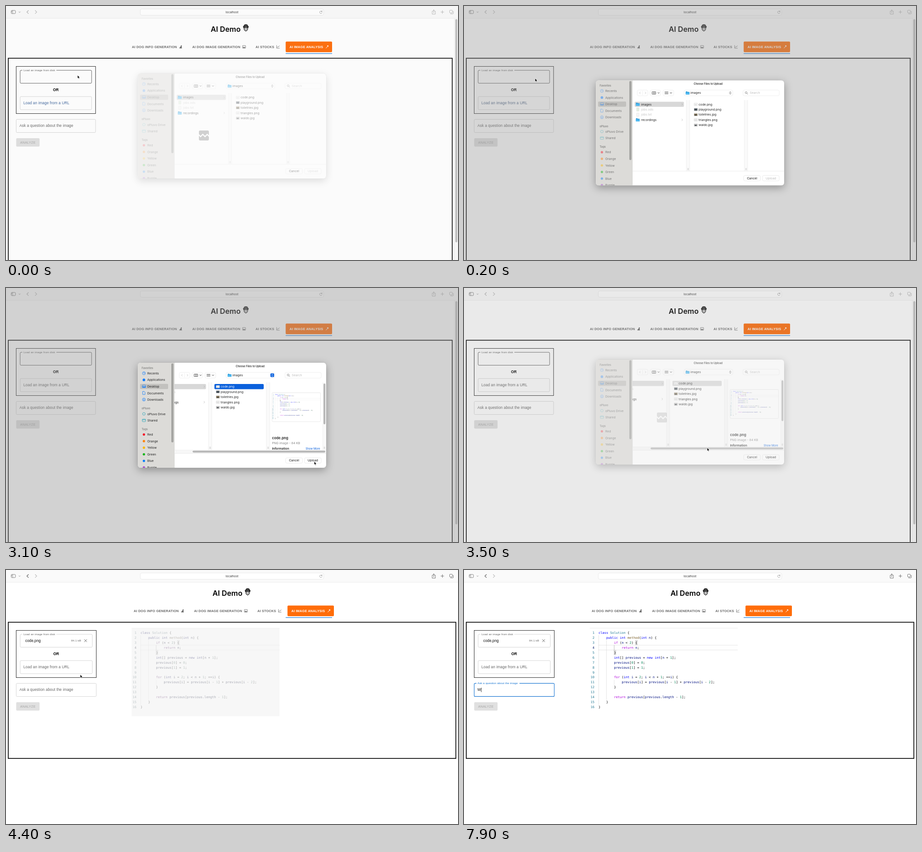
An HTML page that plays this animation: 998 px wide and 561 px high, repeating every 8000 ms.

```html
<!DOCTYPE html>
<html lang="en">
<head>
<meta charset="utf-8">
<title>AI Demo</title>
<style>
html, body { margin: 0; width: 100%; height: 100%; overflow: hidden; background: #fff; }
svg { display: block; width: 100vw; height: 100vh; font-family: "Liberation Sans", Arial, sans-serif; }
text { white-space: pre; }
.ui { font-family: Inter, "Open Sans", sans-serif; }
.mono { font-family: "DejaVu Sans Mono", "Liberation Mono", monospace; }
.b { font-weight: 700; }
.s { font-weight: 600; }
.mid { text-anchor: middle; }
.end { text-anchor: end; }
.caps { letter-spacing: .2px; }
.body { letter-spacing: .078px; }
</style>
</head>
<body>
<svg id="stage" viewBox="0 0 998 561" preserveAspectRatio="none"></svg>
<script>
const LOOP = 8000, STEP = 100, CLOSED = 3700;
const BLUE = '#1976d2', MAC = '#0a60dc';
const stage = document.getElementById('stage');

// Drawing helpers, each returns SVG markup
const esc = s => s.replace(/&/g, '&amp;').replace(/</g, '&lt;');
const text = (x, y, s, size, fill, cls = '') =>
  `<text x="${x}" y="${y}" font-size="${size}" fill="${fill}" class="${cls}">${esc(s)}</text>`;
const ui = (x, y, s, fill = '#222', cls = '', size = 6.76) => text(x, y, s, size, fill, 'ui ' + cls);
const rect = (x, y, w, h, fill, r = 0, stroke = 'none', sw = .6) =>
  `<rect x="${x}" y="${y}" width="${w}" height="${h}" rx="${r}" fill="${fill}" stroke="${stroke}" stroke-width="${sw}"/>`;
const line = (d, stroke, sw = .8, fill = 'none') =>
  `<path d="${d}" fill="${fill}" stroke="${stroke}" stroke-width="${sw}" stroke-linecap="round" stroke-linejoin="round"/>`;
const shape = (d, fill) => `<path d="${d}" fill="${fill}"/>`;
const dot = (x, y, r, fill, stroke = 'none') =>
  `<circle cx="${x}" cy="${y}" r="${r}" fill="${fill}" stroke="${stroke}" stroke-width=".8"/>`;
const group = (s, attrs) => `<g ${attrs}>${s}</g>`;
const move = (s, x, y = 0, more = '') => group(s, `transform="translate(${x} ${y})" ${more}`);

// Time helpers
const clamp = v => Math.max(0, Math.min(1, v));
const part = (t, a, b) => clamp((t - a) / (b - a));
const smooth = p => p * p * (3 - 2 * p);
const mix = (a, b, p) => a + (b - a) * p;
function at(keys, t) {
  let i = 0;
  while (i < keys.length - 2 && t >= keys[i + 1][0]) i++;
  const [a, b] = [keys[i], keys[i + 1]], p = part(t, a[0], b[0]);
  return a.slice(1).map((v, k) => mix(v, b[k + 1], p));
}

// time, dialog offset, dialog opacity, veil opacity
const SHEET = [[0, -16, .38, .04], [100, -6, .8, .25], [200, -.7, 1, .38], [300, 0, 1, .42],
  [3300, 0, 1, .42], [3400, -2, .86, .33], [3500, -7, .62, .2], [3600, -14, .22, .06], [3700, -16, 0, 0]];
// time, x, y
const POINTER = [[0, 158, 153], [200, 157, 160], [500, 205, 215], [900, 300, 280], [1000, 310, 281],
  [1300, 505, 209], [1600, 526, 219], [1900, 527, 222], [2300, 590, 330], [2500, 640, 412],
  [2700, 674, 404], [2900, 682, 386], [3200, 680, 382], [3500, 537, 353], [3700, 430, 320],
  [4000, 240, 260], [4400, 164, 231], [4700, 156, 224], [5100, 142, 213], [6100, 142, 213],
  [6400, 82, 285], [6700, 74, 270], [6900, 74, 264], [7900, 74, 264]];

// Code picture
const CODE = `class Solution {
    public int method(int n) {
        if (n < 2) {
            return n;
        }
        int[] previous = new int[n + 1];
        previous[0] = 0;
        previous[1] = 1;

        for (int i = 2; i < n + 1; ++i) {
            previous[i] = previous[i - 1] + previous[i - 2];
        }

        return previous[previous.length - 1];
    }
}`.split('\n');
const CHAR = 4.275, ROW = 10.92;
function tokenColor(s) {
  if (/^(class|public|int|new)$/.test(s)) return '#0000ff';
  if (/^(if|for|return)$/.test(s)) return '#af00db';
  if (s === 'Solution') return '#267f99';
  if (s === 'method') return '#795e26';
  if (/^\d/.test(s)) return '#098658';
  return /^\w/.test(s) ? '#001080' : '#000';
}
function codeLine(s, i) {
  const y = 141.2 + i * ROW, body = s.trimStart(), x = 297 + (s.length - body.length) * CHAR;
  const spans = (body.match(/\w+|\W+/g) || [])
    .map(k => `<tspan fill="${tokenColor(k)}">${esc(k)}</tspan>`).join('');
  return text(288, y, String(i + 1), 7.1, i === 3 ? '#0b216f' : '#237893', 'mono end') +
    `<text x="${x}" y="${y}" font-size="7.1" class="mono">${spans}</text>`;
}
const codeImage = (() => {
  const guide = (x, a, b, c = '#d3d3d3') => line(`M${x} ${133.6 + a * ROW}V${133.6 + b * ROW}`, c, .6);
  return rect(277.5, 128, 326.5, 195, '#fff') + line('M278 128.4H604', '#e4e4e4', .7) +
    line('M297 166.1H604M297 176.7H604', '#e2e2e2', .9) +
    guide(297.5, 1, 15) + guide(314.5, 2, 14) + guide(331.6, 3, 4, '#939393') + guide(331.6, 10, 11) +
    rect(378.3, 155.5, 4.6, 9.8, '#e8e8e8', 0, '#b9b9b9', .5) +
    rect(331, 177.4, 4.6, 9.8, '#e8e8e8', 0, '#b9b9b9', .5) + CODE.map(codeLine).join('');
})();

function chrome(open) {
  const ink = open ? '#aaa' : '#555', soft = '#b8b8b8';
  return rect(0, 0, 998, 27, '#fafafa') + line('M0 27.2H998', '#e6e6e6', .7) +
    rect(296.5, 6.5, 405, 14, '#fff', 3.5, '#dedede') +
    ui(499, 16.2, 'localhost', '#333', 'mid', 6.6) +
    rect(11.5, 9.8, 9.4, 7, 'none', 1.5, '#777', .9) + line('M14.8 10V16.6M12.6 11.8H13.5M12.6 13.2H13.5', '#777', .7) +
    line('M28.4 12.8L30 14.4L31.6 12.8', '#888', .9) +
    line('M49.5 10L46 13.3L49.5 16.6', ink, 1.1) + line('M64.5 10L68 13.3L64.5 16.6', soft, 1.1) +
    line('M697.6 12.2A2.8 2.8 0 1 0 698 14.6M697.8 10.4V12.5H695.8', '#888', .7) +
    line('M942.5 11.5H941V18H948V11.5H946.5M944.5 15V8.6M942.7 10.3L944.5 8.5L946.3 10.3', ink) +
    line('M960.2 13.3H966.8M963.5 10V16.6', ink) +
    rect(979.5, 9.3, 6, 6, 'none', 1, ink, .8) + line('M981.5 17.4H986.5Q987.7 17.4 987.7 16.2V11.5', ink);
}

const robot = shape('M-5 -4Q-4.5 -8 0 -8Q4.5 -8 5 -4L6.4 -3.4L5.4 -.4L-5.4 -.4L-6.4 -3.4Z', '#111') +
  line('M-4.4 0Q-4.4 5 0 7Q4.4 5 4.4 0', '#111', 1.1) + dot(-2, 1.4, 1, '#111') + dot(2, 1.4, 1, '#111') +
  line('M-1.8 4.2H1.8', '#111', .8) + line('M-3.4 -4.4Q0 -6.4 3.4 -4.4M-2 -2.4H2', '#fff', .6);

function header(open) {
  const gray = '#666', tab = (x, s, c = gray) => text(x, 93.1, s, 7.28, c, 'b caps');
  const s = text(452, 57, 'AI Demo', 16.2, '#000', 'ui s') + move(robot, 529.6, 48.6) +
    rect(617.5, 78.5, 102.5, 23.5, '#ff6d0a', 2) +
    tab(278, 'AI DOG INFO GENERATION') + tab(411.2, 'AI DOG IMAGE GENERATION') +
    tab(551, 'AI STOCKS') + tab(626, 'AI IMAGE ANALYSIS', '#fff') +
    shape('M386 87.2L388 87L388.4 88.4L387.5 89.2L388.6 93.4H382.8Q382.6 91.2 385.4 90Z', gray) +
    rect(522.2, 87.3, 6.8, 5.8, 'none', .6, gray, .8) + shape('M522.8 92.4L524.6 89.8L526 91.2L527 90.2L528.6 92.4Z', gray) +
    line('M597.6 87V93.2H603.8M599 91.4L600.6 89.4L601.7 90.4L603.6 87.8', gray, .8) +
    line('M706.6 93L710 89.4', '#fff', 1) + shape('M708.6 87.2L711.8 87L711.6 90.4L710 89Z', '#fff');
  return move(s, open ? 0 : 4) + rect(617.5, 104.4, 102.5, 1.2, BLUE);
}

// Outlined input; the top edge is open from x+5 for "gap" pixels
function outline(x, y, w, h, gap, stroke, sw) {
  const r = x + w, b = y + h;
  const top = gap ? `M${x + 5} ${y}H${x + 2}` : `M${x + w / 2} ${y}H${x + 2}`;
  const tail = gap ? `H${x + 5 + gap}` : `H${x + w / 2}`;
  return `<path d="${top}Q${x} ${y} ${x} ${y + 2}V${b - 2}Q${x} ${b} ${x + 2} ${b}H${r - 2}Q${r} ${b} ${r} ${b - 2}V${y + 2}Q${r} ${y} ${r - 2} ${y}${tail}" fill="none" stroke="${stroke}" stroke-width="${sw}"/>`;
}
function input(x, y, w, label, o) {
  const lift = o.lift, on = o.focus;
  const scale = mix(1, .75, lift), ly = mix(y + 16.7, y + 1.8, lift);
  return outline(x, y, w, 29, lift * o.gap, on ? BLUE : o.hover ? '#222' : '#c4c4c4', on ? 1.1 : .7) +
    group(text(0, 0, label, 8.32, on ? BLUE : o.ink || '#666', 'body'),
      `transform="translate(${x + 7.2} ${ly}) scale(${scale})"`);
}

function form(t, open) {
  const dw = open ? 0 : 1.5;
  const urlFocus = t >= 5500 && t < 6900, askFocus = t >= 6900;
  const urlLift = part(t, 5400, 5600) - part(t, 6800, 7100), askLift = part(t, 6800, 7000);
  const blue = clamp(1 - t / 500), tint = `rgb(${mix(102, 66, blue)},${mix(102, 104, blue)},${mix(102, 158, blue)})`;
  let s = rect(22.5, 133.4, 175.3 + dw, 104.2, 'none', 0, '#111', .9) +
    outline(31.2, 142, 157.8 + dw, 28.6, 75, open ? '#222' : '#c4c4c4', .7) +
    text(38.4, 143.8, 'Load an image from disk', 6.24, '#666', 'body') +
    text(110 + dw / 2, 188, 'OR', 8.32, '#000', 'b mid') +
    input(31.2, 200, 157.8 + dw, 'Load an image from a URL',
      { lift: urlLift, focus: urlFocus, gap: 81, ink: tint, hover: t >= 4900 && t < 5500 }) +
    input(22.5, 250.4, 175.3 + dw, 'Ask a question about the image',
      { lift: askLift, focus: askFocus, gap: 95, hover: t >= 6300 && t < 6900 }) +
    rect(22.5, 292, 51.6, 18.5, '#e0e0e0', 2) + text(48.2, 303.8, 'ANALYZE', 7.28, '#a6a6a6', 'caps mid');
  if (!open) {
    const show = part(t, 3600, 3900);
    s += group(text(42.5, 158.8, 'code.png', 8.32, '#111') + text(144, 158.4, '84.1 kB', 6.24, '#666', 'body') +
      line('M173 153.4L178.4 158.8M178.4 153.4L173 158.8', '#444', .8), `opacity="${show}"`);
  }
  if (t >= 5600 && t < 6000) s += rect(38.3, 209.5, .7, 10, '#000');
  if (t >= 7000 && t < 7900) s += group(rect(29.6, 260, .7, 10, '#000'), `opacity="${1 - part(t, 7400, 7700)}"`);
  if (t >= 7900) s += text(29.6, 267.4, 'W', 8.32, '#111') + rect(37.7, 260, .8, 9.6, '#000');
  return s;
}

const BROKEN = 'M21 5v6.59l-3-3.01-4 4.01-4-4-4 4-3-3.01V5c0-1.1.9-2 2-2h14c1.1 0 2 .9 2 2zm-3 6.42l3 3.01V19c0 1.1-.9 2-2 2H5c-1.1 0-2-.9-2-2v-6.58l3 2.99 4-4 4 4 4-3.99z';

function page(t, open) {
  let s = rect(0, 0, 998, 561, '#fff') + chrome(open) + header(open);
  s += open ? rect(5, 115.4, 980.3, 500, 'none', 0, '#000', 1.7) : rect(5, 115.4, 988.3, 300.8, 'none', 0, '#000', 1.7);
  s += form(t, open);
  if (open) {
    return s + rect(990, 27.5, 8, 534, '#fafafa') + line('M990 27.5V561', '#e8e8e8', .6) +
      rect(992, 29, 4.6, 493, '#c1c1c1', 2.3) +
      group(shape(BROKEN, '#b4b4b4'), 'transform="translate(422.3 271.3) scale(1.222)"');
  }
  // The picture fades in while its contrast and colour build up
  const alpha = smooth(part(t, 3700, 5200)), a = smooth(part(t, 3700, 5950)), b = smooth(part(t, 5950, 6700));
  const look = t < 6700 ? `saturate(${mix(mix(.2, .6, a), 1, b)}) contrast(${mix(.5, 1, a)}) brightness(${mix(1.2, 1, a)})` : 'none';
  return s + group(codeImage, `style="opacity:${alpha};filter:${look}"`);
}

const folder = (x, y) => shape(`M${x} ${y + 1}Q${x} ${y} ${x + 1} ${y}H${x + 3}L${x + 4} ${y + 1}H${x + 7.4}Q${x + 8.2} ${y + 1} ${x + 8.2} ${y + 2}V${y + 6.6}H${x}Z`, '#2395d6') +
  rect(x, y + 2.2, 8.2, 4.6, '#4db8f0', .7);
const chevron = (x, y, c, d = 1, sw = .8) => line(`M${x - d * .9} ${y - 2}L${x + d * .9} ${y}L${x - d * .9} ${y + 2}`, c, sw);
const drop = (x, y) => line(`M${x - 1.7} ${y - .8}L${x} ${y + .9}L${x + 1.7} ${y - .8}`, '#333', 1);

function sidebar(active) {
  const ink = active ? '#222' : '#777', blue = '#0a7aff', teal = '#1fa3b8';
  const pitch = 14.55, head = (y, s) => ui(299.5, y, s, '#858583', 's', 5.72);
  const items = (y, names) => names.map((s, i) => ui(312, y + i * pitch, s, ink)).join('');
  const icons = dot(304.5, 188.3, 3.3, 'none', blue) + line('M304.5 186.3V188.5H306', blue, .7) +
    dot(304.5, 202.9, 2.9, blue) +
    rect(301, 214.4, 7.4, 5.4, 'none', .8, blue, .8) + rect(301.4, 217.6, 6.6, 1.8, blue) +
    line('M302.2 228.4H305.2L307 230.2V235.2H302.2Z', blue) +
    dot(304.5, 246.4, 3.3, 'none', blue) + line('M304.5 244.6V248M303.2 246.8L304.5 248.1L305.8 246.8', blue, .7) +
    dot(304.5, 278, 2.9, 'none', teal) +
    rect(301, 289.6, 7.2, 5.6, 'none', .8, teal, .8) + line('M301 291.2H308', teal) +
    ['#f3182b', '#ff8410', '#f8b80e', '#17b51d', '#0a80fa', '#a64fd0']
      .map((c, i) => dot(304.5, 323.6 + i * pitch, 2.6, c)).join('');
  return rect(291, 165, 81, 232, '#dcdbd8') + line('M371.8 165V397', '#cfcecb', .6) +
    rect(296, 211.8, 62, 11.4, '#c2c1be', 2) + rect(365, 166.5, 4.8, 174.5, '#a4a4a1', 2.2) +
    head(179, 'Favorites') + items(190.9, ['Recents', 'Applications', 'Desktop', 'Documents', 'Downloads']) +
    head(268.3, 'oPluvo') + items(280.6, ['oPluvo Drive', 'Shared']) +
    head(314, 'Tags') + items(326.2, ['Red', 'Orange', 'Yellow', 'Green', 'Blue', 'Purple']) +
    group(icons, `opacity="${active ? 1 : .45}"`);
}

function toolbar(active) {
  const box = (x, w) => rect(x, 186.4, w, 12.6, '#fff', 3, '#e4e4e4');
  const cols = line('M415.6 190.2H423.4V195.4H415.6ZM418.2 190.2V195.4M420.8 190.2V195.4', '#444', .8);
  const cells = [0, 1, 2].map(i => rect(443.4 + i * 2.7, 190, 2, 1.8, '#555') + rect(443.4 + i * 2.7, 193.4, 2, 1.8, '#555')).join('');
  return ui(539, 175, 'Choose Files to Upload', '#333', 's mid', 5.72) +
    box(382.5, 23.5) + chevron(388.4, 192.7, '#bbb', -1) + chevron(400.8, 192.7, '#bbb') + line('M394.4 188.5V197', '#e4e4e4', .6) +
    box(411, 23) + cols + drop(429.6, 192.7) + box(439.5, 23.5) + cells + drop(457, 192.7) +
    box(486, 107.5) + folder(489.6, 189.4) + ui(500, 195.1, 'images') +
    (active ? rect(583.8, 188.6, 8.2, 8.2, MAC, 2) : '') +
    line('M586.4 191.8L587.9 190.2L589.4 191.8M586.4 193.7L587.9 195.3L589.4 193.7', active ? '#fff' : '#333', .9) +
    box(616, 80) + dot(623, 192.1, 2.1, 'none', '#777') + line('M624.7 193.8L626.6 195.6', '#777') + ui(631, 195.1, 'Search', '#bdbdbd');
}

function columns(t, active) {
  const picked = t >= 1800, preview = t >= 2000, pitch = 11.45;
  const back = (x, live) => rect(x, 212.1, 108.8, 11.4, live && active ? MAC : '#d8d8d8', 2);
  const rowText = (x, i, s, c) => ui(x, 220.3 + i * pitch, s, c);
  const doc = (x, i, c) => rect(x, 214.1 + i * pitch, 5.6, 7.4, c, .5, '#dadada', .5);
  const handleY = preview ? 351 : 359;
  const gutter = x => rect(x, 208, 7.4, 158, '#fafafa') + line(`M${x} 208V366M${x + 7.4} 208V366`, '#e6e6e6', .6) +
    line(`M${x + 2.9} ${handleY}v4M${x + 4.6} ${handleY}v4`, '#b5b5b5', .6);
  const lit = active && !picked, shift = 44 * smooth(part(t, 1800, 2200));
  const shades = ['#f4f4f4', '#566069', '#8a7a5c', '#ececec', '#b9b9b9'];
  let s = back(376.8, !picked) + folder(379.6, 214.4) + rowText(391, 0, 'images', lit ? '#fff' : '#222') +
    chevron(481.8, 217.8, lit ? '#fff' : '#aaa', .8, .7) +
    doc(381, 1, '#e3eee0') + rowText(391, 1, 'jobs.ods', '#c4c4c4') + doc(381, 2, '#f6f6f6') + rowText(391, 2, 'jobs.txt', '#c4c4c4') +
    folder(379.6, 248.8) + rowText(391, 3, 'recordings') + chevron(481.8, 252.2, '#aaa', .8, .7) +
    gutter(491) + gutter(619);
  if (picked) s += back(504.2, true);
  ['code.png', 'playground.png', 'toiletries.jpg', 'triangles.png', 'waldo.jpg'].forEach((name, i) => {
    s += rect(508, 215.2 + i * pitch, 7.6, 5.4, shades[i], .5, '#cfcfcf', .5) +
      rect(509.6, 217.6 + i * pitch, 4, 2, i % 3 ? '#3a3f44' : '#ddd') +
      rowText(518, i, name, picked && active && !i ? '#fff' : '#222');
  });
  s = move(s, -shift);
  if (preview) {
    s += group(codeImage, 'transform="translate(496.4 189.2) scale(.328)"') + rect(587.4, 231.2, 107, 64, 'none', 2, '#dcdcdc') +
      ui(587.4, 334, 'code.png', '#222', 's', 7.8) + ui(587.4, 344.6, 'PNG image - 84 KB', '#858585') +
      ui(587.4, 357, 'Information', '#222', 's') + ui(693.6, 357, 'Show More', MAC, 'end', 6) +
      rect(699.6, 209, 7.4, 150, '#fafafa') + line('M699.6 209V358', '#e6e6e6', .6) + rect(701, 211, 4.2, 90, '#b9b9b9', 2.1) +
      line('M702.2 351v4M703.9 351v4', '#b5b5b5', .6) +
      rect(372, 358, 335, 7, '#f7f7f7') + line('M372 358H707', '#e6e6e6', .6) + rect(412, 359.2, 293, 4.2, '#b7b7b7', 2.1);
  }
  return group(s, 'clip-path="url(#list)"');
}

function dialog(t, dy, alpha) {
  const active = t >= 300 && t < 3400, ready = t >= 1900;
  const button = (x, s, c) => rect(x, 375, 37, 12, '#fff', 3, '#dedede') + ui(x + 18.5, 383.3, s, c, 'mid');
  const body = rect(291, 165, 416, 232, '#fff') + sidebar(active) + toolbar(active) + columns(t, active) +
    line('M372 365.4H707', '#e4e4e4', .7) + button(617.5, 'Cancel', '#111') + button(659, 'Upload', ready ? '#111' : '#bcbcbc');
  return move(`<rect x="291.2" y="165" width="415.6" height="232" rx="6" fill="#fff" stroke="#aaa" stroke-width=".6" style="filter:drop-shadow(0 5px 9px rgba(0,0,0,.32))"/>` +
    group(body, 'clip-path="url(#sheet)"'), 0, dy, `opacity="${alpha}"`);
}

function pointer(t) {
  if (t >= 7900) return '';
  const [x, y] = at(POINTER, t);
  const beam = (t >= 4900 && t < 6200) || t >= 6700;
  return move(beam
    ? line('M-1.6 -4.8Q0 -4.8 0 -3.6V3.6Q0 4.8 -1.6 4.8M1.6 -4.8Q0 -4.8 0 -3.6M0 3.6Q0 4.8 1.6 4.8', '#222', .7)
    : line('M0 0V7L1.6 5.6L2.7 8.1L3.9 7.6L2.8 5.2H4.9Z', '#fff', .6, '#000'), x, y);
}

const defs = `<defs><clipPath id="sheet">${rect(291.2, 165, 415.6, 232, '#000', 6)}</clipPath>` +
  `<clipPath id="list">${rect(372, 208.5, 335, 157, '#000')}</clipPath></defs>`;

function scene(t) {
  const open = t < CLOSED;
  let s = defs + page(t, open);
  if (open) {
    const [dy, alpha, veil] = at(SHEET, t);
    s += group(rect(0, 0, 998, 561, '#949494'), `opacity="${veil}"`) + dialog(t, dy, alpha);
  }
  return s + pointer(t);
}

let shown = -1;
const start = performance.now();
function tick() {
  const t = Math.floor(((performance.now() - start) % LOOP) / STEP) * STEP;
  if (t !== shown) {
    shown = t;
    stage.innerHTML = scene(t);
  }
  requestAnimationFrame(tick);
}
tick();
</script>
</body>
</html>
```
